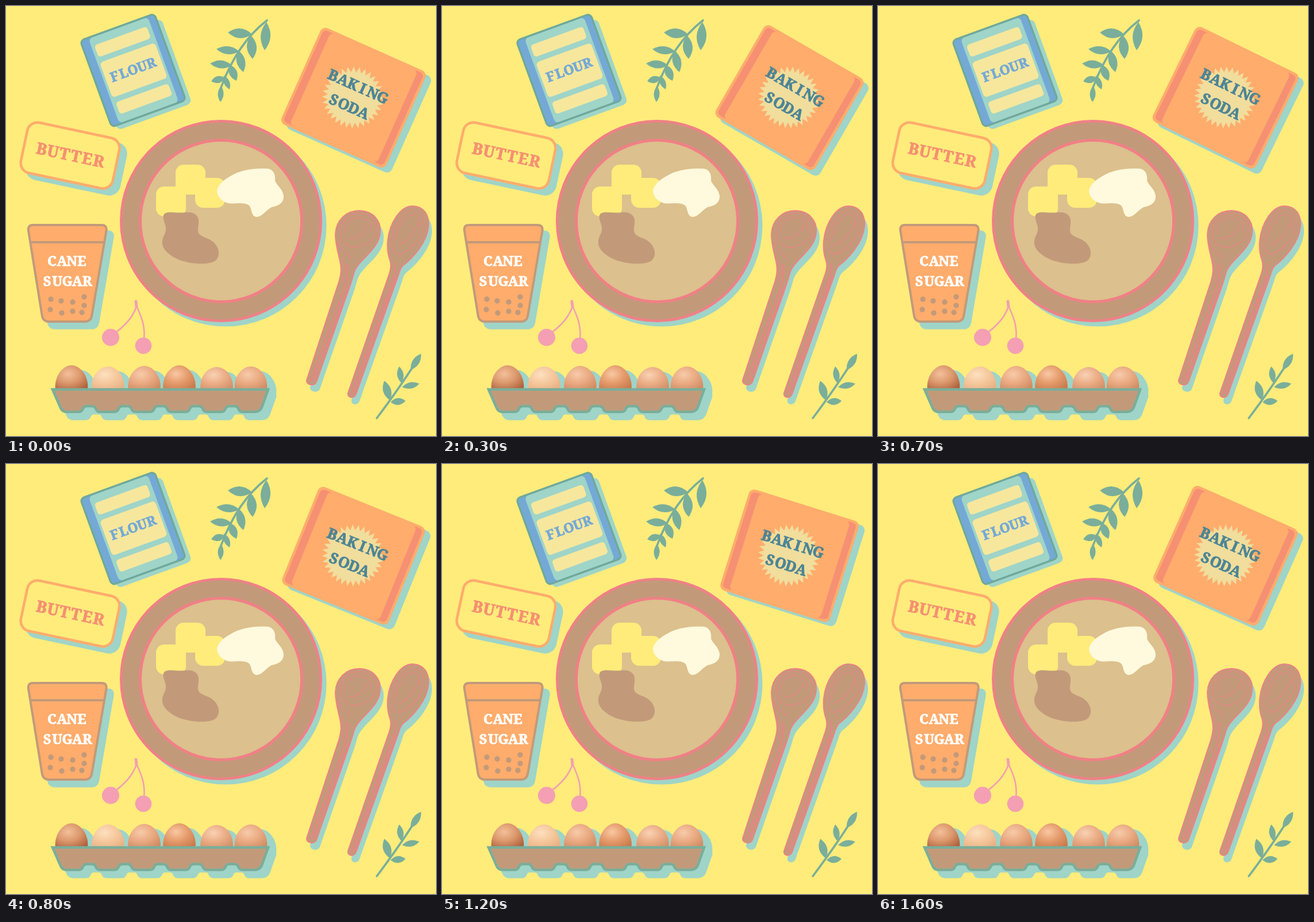
Animation, 748 px wide and 748 px high, one loop 1700 ms. Source, as an HTML page:

```html
<!DOCTYPE html>
<html lang="en">
<head>
<meta charset="utf-8">
<title>Baking ingredients</title>
<style>
  html, body { margin: 0; height: 100%; overflow: hidden; background: #ffec7b; }
  svg { display: block; width: 100vw; height: 100vh; }
  text { font-family: "Noto Serif", serif; font-weight: bold; text-anchor: middle; }
</style>
</head>
<body>
<svg id="stage" viewBox="0 0 748 748"></svg>
<script>
const C = {
  butter: '#ffec7b', shade: '#9fd4c8', green: '#7aae9a', brown: '#c29a7a', tan: '#dcc08d',
  pink: '#f08086', orange: '#ffac6c', salmon: '#f69072', label: '#f6e79d', blue: '#74a9d6',
  cherry: '#f49fb3', ink: '#4c8595', burst: '#f1dd9c'
};

const path = (d, fill, extra = '') => `<path d="${d}" fill="${fill}" ${extra}/>`;
const line = (d, color, width) =>
  path(d, 'none', `stroke="${color}" stroke-width="${width}" stroke-linecap="round"`);
const circle = (x, y, r, fill, extra = '') =>
  `<circle cx="${x}" cy="${y}" r="${r}" fill="${fill}" ${extra}/>`;
const group = (transform, ...parts) => `<g transform="${transform}">${parts.join('')}</g>`;

// Rounded rectangle placed by its centre
const box = (x, y, w, h, r, fill, extra = '') =>
  `<rect x="${x - w / 2}" y="${y - h / 2}" width="${w}" height="${h}" rx="${r}" fill="${fill}" ${extra}/>`;

// Typewriter lettering: every character sits in the middle of an equal cell
const typed = (str, x, y, cell, fill) => {
  const xs = [...str].map((c, i) => x + (i - (str.length - 1) / 2) * cell);
  return `<text x="${xs.join(' ')}" y="${y}" font-size="${cell * 1.36}" fill="${fill}" ` +
    `stroke="${fill}" stroke-width=".9">${str}</text>`;
};

const leaf = ([x, y, tx, ty, w]) => {
  const len = Math.hypot(tx - x, ty - y);
  const nx = (y - ty) / len * w, ny = (tx - x) / len * w;
  const side = s => `${x + (tx - x) * .5 + nx * s},${y + (ty - y) * .5 + ny * s}`;
  return path(`M${x},${y}Q${side(1)} ${tx},${ty}Q${side(-1)} ${x},${y}Z`, C.green);
};
const branch = (stem, leaves) => line(stem, C.green, 3.6) + leaves.map(leaf).join('');

function flour() {
  return group('translate(232 119) rotate(-20)', box(0, 0, 138, 157, 9, C.shade)) +
    group('translate(221 112) rotate(-20)',
      box(0, 0, 138, 161, 8, C.blue),
      box(1, 0, 110, 158, 8, C.shade),
      box(0, 0, 137, 160, 7, 'none', `stroke="#6fa99b" stroke-width="3.5"`),
      box(0, -53, 97, 22, 5, C.label),
      box(1, 0, 102, 65, 6, C.label),
      box(1, 53, 97, 22, 5, C.label),
      typed('FLOUR', 0, 7, 17, C.blue));
}

function butter() {
  return group('translate(122.5 270) rotate(12)', box(0, 0, 168, 94, 20, C.shade)) +
    group('translate(111.5 260) rotate(12)',
      box(0, 0, 163.5, 89.5, 18, C.butter, `stroke="${C.orange}" stroke-width="4.5"`),
      typed('BUTTER', 0, 9, 20.3, C.salmon));
}

function sugar() {
  const cup = 'M47,381H166Q176,381 174.5,391L149,540Q147,549 137,549H75Q65,549 63,540L39,391Q37.5,381 47,381Z';
  const grains = [[78, 510], [96, 513], [116, 515], [136, 506], [77, 528], [97, 534], [116, 531], [136, 521], [132, 533]];
  return path(cup, C.shade, `stroke="${C.shade}" stroke-width="4" transform="translate(11 11.5)"`) +
    path(cup, C.orange, `stroke="${C.brown}" stroke-width="4"`) +
    line('M43,411H171', C.brown, 4) +
    grains.map(([x, y]) => circle(x, y, 4.7, C.brown)).join('') +
    typed('CANE', 106, 452, 17.4, '#fff') + typed('SUGAR', 106.5, 487, 17.4, '#fff');
}

function bowl() {
  const cream = 'M367,321C370,307 385,298 402,290C420,283 442,282 456,283C466,285 469,294 468,304' +
    'C471,312 482,319 483,331C483,344 472,348 462,350C452,355 447,366 436,367' +
    'C426,366 428,353 423,347C413,340 398,345 386,343C375,340 367,331 367,321Z';
  const dough = 'M276,361C284,356 298,361 312,359C326,357 335,364 335,373C336,381 332,388 335,395' +
    'C341,404 353,402 363,413C373,424 372,438 363,444C349,451 320,449 300,441' +
    'C280,432 270,420 272,408C273,399 279,396 278,385C277,377 270,367 276,361Z';
  return circle(382, 382, 175.5, C.shade) +
    circle(374, 374, 173.7, C.brown, `stroke="${C.pink}" stroke-width="4.6"`) +
    circle(374, 374, 140.5, C.tan, `stroke="${C.pink}" stroke-width="5"`) +
    [[321, 302], [287, 340], [355, 325]].map(([x, y]) => box(x, y, 52, 52, 14, C.butter)).join('') +
    path(cream, '#fff9dd') + path(dough, C.brown);
}

function spoon(shape, grain) {
  return path(shape, C.shade, 'transform="translate(6 12)"') +
    path(shape, C.brown, `stroke="${C.pink}" stroke-width="2"`) + grain;
}

function spoons() {
  const round = 'M614,356C640,356 652,375 651,392C650,425 612,440 605,465C603,472 602,476 600,482' +
    'L540,654C537,662 522,660 523,651L579,480C583,466 584,458 581,444C578,430 573,415 573,397C574,372 592,356 614,356Z';
  const oval = 'M708,348C728,349 736,364 735,382C733,412 706,440 690,452C686,456 685,460 683,467' +
    'L609,675C606,684 593,682 595,673L667,465C670,455 670,450 668,443C664,432 663,420 664,408C667,378 686,347 708,348Z';
  return spoon(round,
      line('M582,398C580,374 598,360 616,361C640,363 649,382 642,398C632,418 606,424 592,416C585,412 582,406 582,398Z' +
        'M588,396C588,376 602,367 616,368C630,370 638,382 634,392M593,403C606,409 622,398 630,380' +
        'M577,412C582,426 592,430 600,438M586,440C590,452 589,466 585,480', C.pink, 1.2) +
      line('M594,450C596,466 592,480 588,492L530,652M597,486L535,653', C.pink, 2.2)) +
    spoon(oval,
      line('M671,414C671,386 690,356 708,355C724,357 729,370 727,384C722,406 696,432 682,432C674,430 671,423 671,414Z' +
        'M677,410C678,388 694,364 707,362C718,364 722,374 719,384M680,416C694,414 712,396 718,376', C.pink, 1.2) +
      line('M677,448C679,456 677,463 674,472L601,674M679,470L605,675', C.pink, 2));
}

function eggs() {
  // x, top, light, mid, dark
  const list = [
    [114, 625, '#f3c09a', '#dc986c', '#b0623e'], [177.5, 627, '#fde0bf', '#f6c89d', '#e8b184'],
    [240.5, 626, '#f7cba9', '#eaaa82', '#d08c63'], [301.5, 625, '#f9c8a2', '#e59b6c', '#c97a4b'],
    [366.5, 628, '#f9d2b4', '#ebae87', '#d3916a'], [426, 627, '#f7cba9', '#eaab83', '#d08d65']
  ];
  const shell = (x, y) => `M${x - 28},668C${x - 31},644 ${x - 15},${y} ${x},${y}C${x + 15},${y} ${x + 31},644 ${x + 28},668Z`;
  let tray = 'M81,667L95,699Q98,706 105,706';
  for (let x = 145; x < 400; x += 62)
    tray += `L${x - 18},706Q${x - 13},706 ${x - 11},700Q${x - 9},696 ${x - 5},696H${x + 5}Q${x + 9},696 ${x + 11},700Q${x + 13},706 ${x + 18},706`;
  tray += 'H434Q442,705 445,698L456,667Z';

  const gradients = list.map(([, , a, b, c], i) =>
    `<radialGradient id="egg${i}" cx=".4" cy=".35" r=".75"><stop stop-color="${a}"/>` +
    `<stop offset=".5" stop-color="${b}"/><stop offset="1" stop-color="${c}"/></radialGradient>`).join('');
  return `<defs>${gradients}</defs>` +
    group('translate(12 12)', path(tray, C.shade, `stroke="${C.shade}" stroke-width="5" stroke-linejoin="round"`)) +
    group('translate(15 9)', ...list.map(([x, y]) =>
      path(shell(x, y), C.shade, `stroke="${C.shade}" stroke-width="2"`))) +
    list.map(([x, y], i) => path(shell(x, y), `url(#egg${i})`)).join('') +
    path(tray, C.brown, `stroke="${C.green}" stroke-width="4.5"`);
}

function cherries() {
  return line('M227,522C220,545 202,560 188,570M227,522C238,545 242,560 240,580', C.cherry, 2.6) +
    line('M226,514L227,523', C.cherry, 5) +
    circle(182, 576.5, 15, C.cherry) + circle(239, 591, 14.3, C.cherry);
}

function soda() {
  const spikes = 32;
  const burst = Array.from({ length: spikes * 2 }, (_, i) => {
    const a = i * Math.PI / spikes, r = i % 2 ? 44 : 54;
    return `${(r * Math.cos(a) - 1).toFixed(1)},${(r * Math.sin(a)).toFixed(1)}`;
  });
  return '<g id="soda">' +
    box(12, 4, 200, 184, 10, C.shade) +
    box(0, 0, 200, 184, 10, C.orange) +
    box(0, 0, 191, 175, 7, C.salmon) +
    box(.5, 0, 166, 176, 8, C.orange) +
    path(`M${burst.join('L')}Z`, C.burst) +
    typed('BAKING', -1, -12, 18.8, C.ink) + typed('SODA', -1.5, 26, 18.8, C.ink) + '</g>';
}

document.getElementById('stage').innerHTML = [
  flour(), butter(), sugar(), bowl(), spoons(), eggs(), cherries(), soda(),
  branch('M454,25Q402,65 374,142', [
    [428, 49, 386, 46, 17], [453, 28, 450, 77, 17], [426, 51, 429, 92, 17], [406, 79, 366, 75, 14],
    [404, 77, 413, 115, 15], [393, 103, 355, 100, 14], [389, 102, 401, 130, 14],
    [381, 125, 357, 131, 12], [379, 121, 389, 145, 10], [374, 139, 373, 167, 10]]),
  branch('M720,608Q690,657 645,717', [
    [704, 633, 722, 605, 12], [688, 656, 684, 627, 11], [689, 663, 719, 657, 11],
    [668, 686, 658, 652, 14], [669, 689, 695, 687, 12]])
].join('');

// The box sways: [ms, degrees], linear between keys, advanced ten times a second
const keys = [[0, 24], [500, 34], [1000, 14], [1600, 24], [1700, 24]];
const sodaBox = document.getElementById('soda');

function draw() {
  const t = Math.floor(performance.now() % 1700 / 100) * 100;
  const k = keys.findIndex(([at]) => at > t);
  const [t0, a0] = keys[k - 1], [t1, a1] = keys[k];
  const angle = a0 + (a1 - a0) * (t - t0) / (t1 - t0);
  sodaBox.setAttribute('transform', `translate(604.5 159.5) rotate(${angle})`);
  requestAnimationFrame(draw);
}
draw();
</script>
</body>
</html>
```
